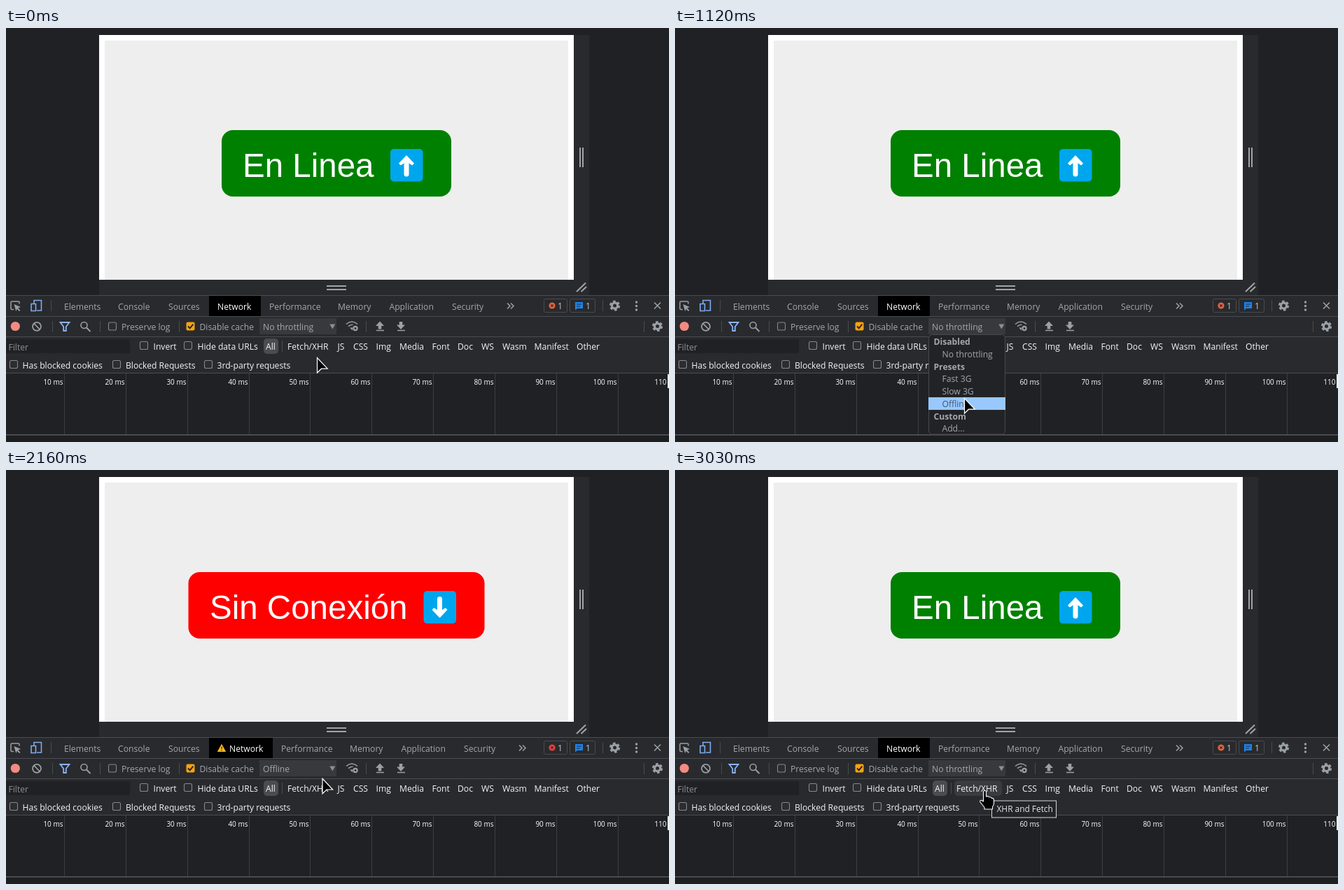
An HTML page that plays this animation: 947 px wide and 592 px high, repeating every 3370 ms.

```html
<!DOCTYPE html>
<html lang="es">
<head>
<meta charset="utf-8">
<title>En Linea / Sin Conexión</title>
<style>
  html, body { margin: 0; width: 100%; height: 100%; overflow: hidden; background: #202124; }
  svg { display: block; width: 100vw; height: 100vh; }
  text { font: 12.15px "Open Sans", "Noto Sans", sans-serif; fill: #a3a8ad; white-space: pre; }
  .light text { fill: #f4f5f7; }
  .ruler text { font-size: 10px; fill: #fff; text-anchor: end; }
  .badge text { fill: #c6c9ce; }
  .head { font-weight: 700; fill: #a4a8ac; }
  .label { font: 47.5px "Liberation Sans", Arial, sans-serif; fill: #fff; }
  .tip text { font-size: 11.9px; fill: #e4e6ea; }
  .icon { fill: none; stroke: #9aa0a6; stroke-width: 1.6; }
</style>
</head>
<body>
<svg viewBox="0 0 947 592" preserveAspectRatio="none">
  <defs>
    <g id="gear" class="icon">
      <circle r="4.1" stroke-width="3.2"/>
      <circle r="6.2" stroke-width="2.8" stroke-dasharray="3.5 2.993"/>
    </g>
    <path id="arrow" d="M0 -14.5 L10.5 -3.5 L8.3 -1 L3 -4.5 V13 Q3 15 0 15 Q-3 15 -3 13 V-4.5 L-8.3 -1 L-10.5 -3.5 Z"
          fill="#fff" stroke="#fff" stroke-linejoin="round"/>
    <path id="load" d="M0 -7 L6 -0.5 H2.3 V4 H-2.3 V-0.5 H-6 Z" fill="#9aa0a6"/>
  </defs>

  <!-- page preview -->
  <rect x="133" y="10" width="700" height="372" fill="#292a2d"/>
  <rect x="133" y="10" width="678" height="350" fill="#fff"/>
  <rect x="141" y="18" width="662" height="342" fill="#eee"/>
  <path d="M820 171V199M824 171V199M458 369H486M458 374H486M815 377L828 364.5M821.5 377L829 370"
        stroke="#a2a4a7" stroke-width="2" fill="none"/>
  <g id="online">
    <rect x="308" y="146" width="328" height="95" rx="16" fill="#008000"/>
    <text class="label" x="338" y="213">En Linea</text>
    <rect x="549" y="173" width="46.5" height="46.5" rx="5" fill="#00a6ed"/>
    <use href="#arrow" x="572" y="197"/>
  </g>
  <g id="offline">
    <rect x="260.5" y="146" width="423" height="95" rx="16" fill="#f00"/>
    <text class="label" x="291" y="213">Sin Conexión</text>
    <rect x="596.5" y="173" width="46.5" height="46.5" rx="5" fill="#00a6ed"/>
    <use href="#arrow" transform="translate(619.5 196.5) rotate(180)"/>
  </g>

  <!-- panel -->
  <rect y="382" width="947" height="112" fill="#292a2d"/>
  <path d="M0 382.5H947M0 412.5H947M0 441.5H947M0 493.5H947" stroke="#494c50"/>
  <rect y="445" width="177" height="20" fill="#202124"/>
  <path d="M64.5 389V405M852.5 389V405M66.5 419V435M134.5 419V435M247.5 419V435M514.5 419V435M911.5 419V435M394.5 447V463"
        stroke="#494c50"/>

  <!-- tab bar -->
  <g class="icon">
    <path d="M11 402.5H8.5Q7 402.5 7 401V392.5Q7 391 8.5 391H17.5Q19 391 19 392.5V394.5" stroke-width="1.5"/>
    <path d="M11.5 395L21 399L17.3 400.5L20.5 403.7L19 405L15.8 401.8L14.3 405Z" fill="#9aa0a6" stroke="none"/>
    <path d="M40 394V389.5H50.5V404H44M36 394.5H42.5V404.5H36Z" stroke="#7facf0"/>
  </g>
  <rect id="active" x="290" y="383" width="74" height="29" fill="#000"/>
  <g id="warn">
    <path d="M308 392.5L313.5 402.5H302.5Z" fill="#f6b71c" stroke="#f6b71c" stroke-linejoin="round"/>
    <path d="M308 395.5V399M308 400.3V401.7" stroke="#40310a" stroke-width="1.3"/>
  </g>
  <g id="tabs"></g>
  <text id="network" y="403" style="fill:#fff">Network</text>
  <g id="tail"><path class="icon" d="M716 393.5L720 397.5L716 401.5M721 393.5L725 397.5L721 401.5" stroke-width="1.4"/></g>
  <g class="badge">
    <rect x="768.5" y="387.5" width="33" height="19" rx="2" fill="none" stroke="#494c50"/>
    <circle id="error" cx="780" cy="397" r="4.6"/>
    <path d="M778.3 395.3L781.7 398.7M781.7 395.3L778.3 398.7" stroke="#292a2d" stroke-width="1.1"/>
    <text x="788" y="402">1</text>
    <rect x="805.5" y="387.5" width="36" height="19" rx="2" fill="none" stroke="#494c50"/>
    <path d="M813 392H824V401H816L813 403.5Z" fill="#1a83f0"/>
    <path d="M815 395H822M815 398H820" stroke="#292a2d"/>
    <text x="828" y="402">1</text>
  </g>
  <use href="#gear" x="869.5" y="397"/>
  <g fill="#9aa0a6"><circle cx="900.5" cy="392" r="1.7"/><circle cx="900.5" cy="397.5" r="1.7"/><circle cx="900.5" cy="403" r="1.7"/></g>
  <path class="icon" d="M926 392.5L935 401.5M935 392.5L926 401.5"/>

  <!-- toolbar -->
  <circle cx="13.3" cy="426.5" r="6.6" fill="#f28b82"/>
  <g class="icon">
    <circle cx="44" cy="426.8" r="6" stroke-width="1.8"/>
    <path d="M40 422.5L48.2 431" stroke-width="1.8"/>
    <circle cx="111.5" cy="425" r="4.5"/>
    <path d="M115 428.5L120.5 434" stroke-width="2"/>
    <path d="M77.5 421H90.5L85.8 427V433H82.2V427Z" stroke="#8ab4f8" stroke-width="1.8"/>
    <path d="M486 423.5Q494 416.5 502 423.5M489 426.7Q492 424 495.5 424.3"/>
    <circle cx="499" cy="429.5" r="2.6" stroke-width="2.2"/>
    <path d="M529 432.5H540M559 432.5H570"/>
  </g>
  <path d="M491 428.5H495V432.5Z" fill="#9aa0a6"/>
  <use href="#load" x="534" y="426.5"/>
  <use href="#load" transform="translate(564 424) rotate(180)"/>
  <use href="#gear" x="930.5" y="426.5"/>
  <rect x="362" y="415" width="110" height="23" fill="#37393c"/>
  <path d="M462.3 423.5H470.3L466.3 430.5Z" fill="#8b9095"/>
  <text id="mode" x="367" y="432"></text>
  <g id="tools"></g>
  <rect x="257.5" y="420.5" width="12" height="12" rx="2" fill="#f5a30f"/>
  <path d="M260 426.5L262.7 429.3L267.3 423.7" fill="none" stroke="#202124" stroke-width="1.9"/>

  <!-- filters -->
  <text x="3.5" y="461" style="fill:#8b9095">Filter</text>
  <rect x="368" y="444" width="21" height="22" rx="5" fill="#4b4c4f"/>
  <rect id="hover" x="399" y="444" width="68" height="22" rx="5" fill="#3a3b3f"/>
  <g id="filters" class="light"></g>

  <!-- timeline -->
  <g id="ruler" class="ruler"></g>
  <path d="M0 581.7H947" stroke="#55585c" stroke-width="1.5"/>
  <rect y="583" width="947" height="9" fill="#1d1e20"/>
  <rect x="945" y="495" width="2" height="20" fill="#f0f1f2"/>

  <!-- overlays -->
  <g id="menu">
    <rect x="362.5" y="438.5" width="109" height="142.5" rx="5" fill="#212326" stroke="#47494d"/>
    <rect id="mark" x="362" width="110" height="18" fill="#99c8ff"/>
  </g>
  <g id="tip" class="tip"><rect x=".5" y=".5" height="24" fill="#242528" stroke="#d5d7da"/><text x="7.5" y="16.5"></text></g>
  <g id="cursor">
    <circle id="click" r="11.8" fill="#f2e40c" fill-opacity=".64"/>
    <path id="pointer" d="M0 0V21.5L6 15.7H14.7Z" fill="#000" stroke="#fff" stroke-width="1.2"/>
    <path id="hand" d="M-2 2Q-2 0 0 0Q2 0 2 2V8.5Q4.5 7 6 9.3Q8.5 8.3 9.5 10.7Q13 10.2 13 14V18Q13 20.5 11 23V26.5H-0.5V24L-6.5 16.5Q-7.5 13.5 -4.5 13.7L-2 15.5Z"
          fill="#000" stroke="#fff" stroke-width="1.1" stroke-linejoin="round"/>
  </g>
</svg>
<script>
const LOOP = 3370, SVG = "http://www.w3.org/2000/svg";
const $ = id => document.getElementById(id);

function add(parent, tag, attrs, content) {
  const el = document.createElementNS(SVG, tag);
  for (const k in attrs) el.setAttribute(k, attrs[k]);
  if (content) el.textContent = content;
  return parent.appendChild(el);
}
const put = (parent, y, items) =>
  items.forEach(([x, s]) => add(parent, "text", { x, y }, s));
const box = (parent, x, y) => add(parent, "rect",
  { x, y, width: 11, height: 11, rx: 2, fill: "#2c2d30", stroke: "#85888c", "stroke-width": 1.1 });

put($("tabs"), 403, [[83, "Elements"], [160, "Console"], [232, "Sources"]]);
put($("tail"), 403, [[376, "Performance"], [474, "Memory"], [547.5, "Application"], [637, "Security"]]);
put($("tools"), 432, [[165, "Preserve log"], [276.5, "Disable cache"]]);
box($("tools"), 146.5, 421);
put($("filters"), 460, [[210.5, "Invert"], [273.5, "Hide data URLs"], [371, "All"], [402, "Fetch/XHR"],
  [473.5, "JS"], [496, "CSS"], [528.5, "Img"], [562, "Media"], [608.5, "Font"], [645, "Doc"],
  [679, "WS"], [709, "Wasm"], [754.5, "Manifest"], [815, "Other"]]);
put($("filters"), 487, [[23.5, "Has blocked cookies"], [171, "Blocked Requests"], [301.5, "3rd-party requests"]]);
for (const x of [191.5, 254.5]) box($("filters"), x, 448.5);
for (const x of [5.5, 152.5, 283.5]) box($("filters"), x, 475.5);

for (let i = 1; i <= 10; i++) {
  const x = Math.round(83 + (i - 1) * 87.85);
  add($("ruler"), "path", { d: `M${x + .5} 494V581`, stroke: "#3c3e41" });
  add($("ruler"), "text", { x: x - 1.5, y: 510 }, i * 10 + " ms");
}
add($("ruler"), "text", { x: 943.5, y: 510 }, "110");

const rowY = i => 453 + i * 17.75;
const rows = ["Disabled", "No throttling", "Presets", "Fast 3G", "Slow 3G", "Offline", "Custom", "Add..."]
  .map((s, i) => {
    const head = i % 4 == 2 || i == 0;
    return add($("menu"), "text", { x: head ? 369.5 : 381.5, y: rowY(i), class: head ? "head" : "" }, s);
  });

// time, x, y of the pointer tip
const path = [
  [0, 444.5, 471.5], [310, 444.5, 471.5], [520, 446, 422.5], [840, 446, 422.5],
  [1120, 413.5, 529.5], [1440, 413.5, 529.5], [1720, 452.5, 447.5], [1850, 454, 446.5],
  [2140, 454, 446.5], [2200, 447, 428], [2250, 447, 428], [2310, 447.5, 456.5],
  [2620, 447.5, 456.5], [2670, 442.5, 458.5], [3370, 442.5, 458.5]
];
const menus = [[700, 1440], [2250, 2930]];
const clicks = [[580, 670], [1350, 1440], [2200, 2250], [2870, 2930]];
const tips = [
  [550, 700, "Throttling", 456, 437, 67],
  [1950, 2160, "XHR and Fetch", 463, 461, 92],
  [3030, LOOP, "XHR and Fetch", 452, 472.5, 92]
];
const marks = [[0, 1], [960, 3], [1010, 4], [1060, 5], [2640, 1]];

const during = (t, [a, b]) => t >= a && t < b;
const show = (id, on) => $(id).setAttribute("visibility", on ? "visible" : "hidden");

function cursorAt(t) {
  const i = path.findIndex(p => p[0] > t);
  const [t0, x0, y0] = path[i - 1], [t1, x1, y1] = path[i];
  const k = (t - t0) / (t1 - t0), e = k * k * (3 - 2 * k);
  return [x0 + (x1 - x0) * e, y0 + (y1 - y0) * e];
}

function draw(t) {
  const [x, y] = cursorAt(t);
  const open = menus.some(m => during(t, m));
  const off = during(t, [1440, 2960]);
  const over = !open && x > 399 && x < 467 && y > 444 && y < 466;

  show("online", !off);
  show("offline", off);
  show("warn", off);
  $("active").setAttribute("width", off ? 91 : 74);
  $("network").setAttribute("x", off ? 319 : 302);
  $("tail").setAttribute("transform", `translate(${off ? 17 : 0})`);
  $("error").setAttribute("fill", off ? "#e8413c" : "#e8603f");
  $("mode").textContent = during(t, [1440, 2930]) ? "Offline" : "No throttling";

  $("menu").style.display = open ? "" : "none";
  const mark = marks.filter(m => m[0] <= t).pop()[1];
  $("mark").setAttribute("y", rowY(mark) - 13.7);
  rows.forEach((r, i) => r.style.fill = i == mark ? "#41566e" : "");

  const tip = tips.find(p => during(t, p));
  show("tip", tip);
  if (tip) {
    $("tip").setAttribute("transform", `translate(${tip[3]} ${tip[4]})`);
    $("tip").firstChild.setAttribute("width", tip[5]);
    $("tip").lastChild.textContent = tip[2];
  }

  show("hover", over);
  show("hand", over);
  show("pointer", !over);
  show("click", clicks.some(c => during(t, c)));
  $("cursor").setAttribute("transform", `translate(${x} ${y})`);
}

const start = performance.now();
function tick() {
  draw((performance.now() - start) % LOOP);
  requestAnimationFrame(tick);
}
tick();
</script>
</body>
</html>
```
